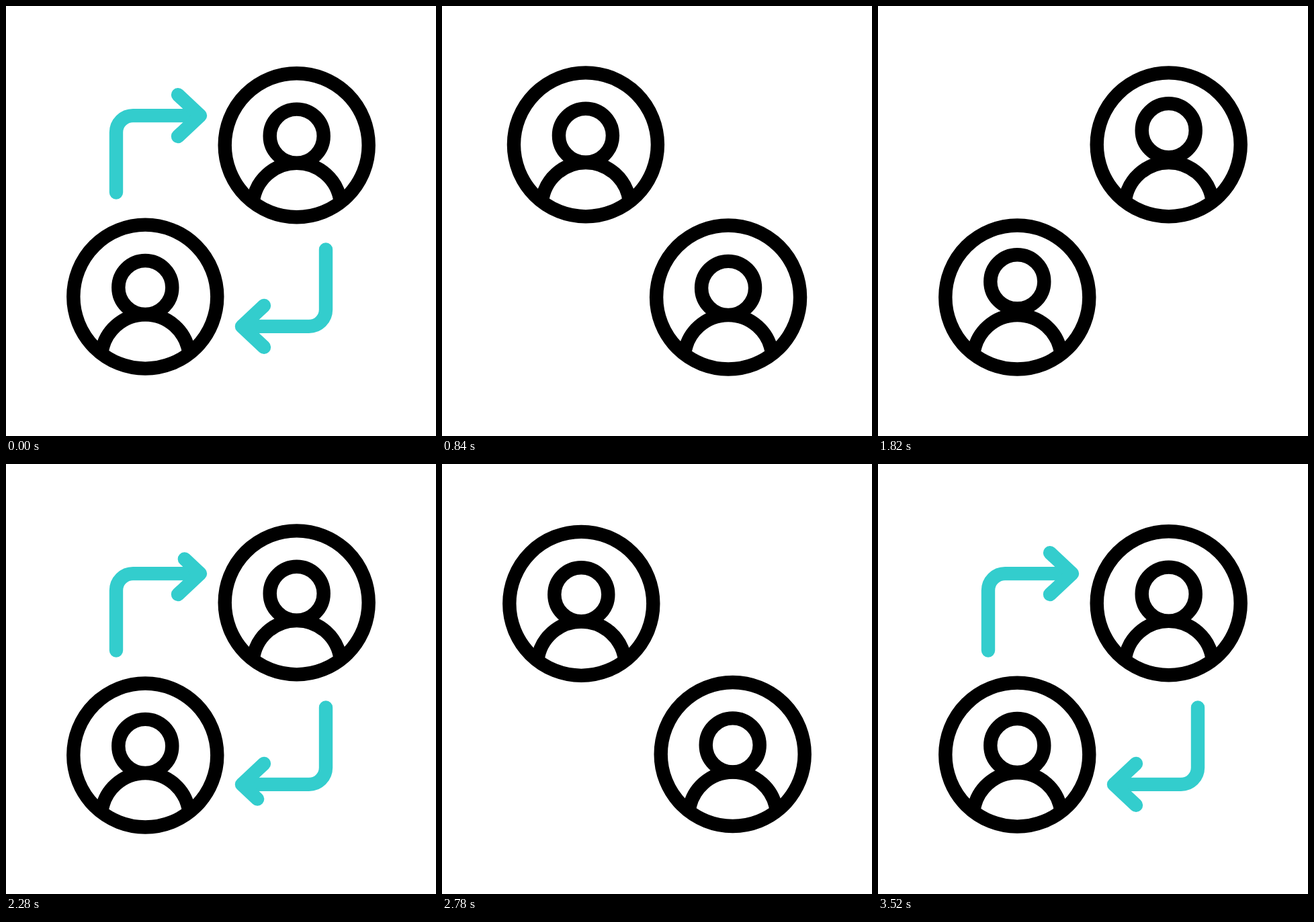
Animation of 640x640 px, one loop 3600 ms. Source, as an HTML page:

```html
<!DOCTYPE html>
<html lang="en">
<head>
<meta charset="utf-8">
<title>User swap</title>
<style>
  html, body { margin: 0; width: 100%; height: 100%; overflow: hidden; background: #fff; }
  svg { display: block; width: 100vw; height: 100vh; }
  g, path, circle { fill: none; stroke-width: 20.4; }
  .user { stroke: #000; }
  #arrow { stroke: #33cdcd; stroke-linecap: round; stroke-linejoin: round; }
</style>
</head>
<body>
<svg viewBox="0 0 640 640">
  <defs>
    <g id="bust">
      <circle r="107"/>
      <path d="M-65.1 84.9A65.5 65.5 0 0 1 65.1 84.9"/>
    </g>
  </defs>
  <g id="arrow">
    <path id="shaft" pathLength="1" d="M164 277.5V188A25 25 0 0 1 189 163.1H288"/>
    <path id="head" pathLength="1" d="M256 194L289 163.1L256 132.2"/>
  </g>
  <use href="#arrow" transform="rotate(180 320 320)"/>
  <g class="user"><use href="#bust"/><circle r="40"/></g>
  <g class="user"><use href="#bust"/><circle r="40"/></g>
</svg>
<script>
const LOOP = 3600;
const LEG = 400;     // one side of the square path
const STROKE = 160;  // time to draw or wipe one arrow part
const REACH = 112.7; // from the centre to a resting user

const users = document.querySelectorAll(".user");
const shaft = document.getElementById("shaft");
const head = document.getElementById("head");

// Smoothstep from 0 to 1
function ramp(t, start, duration) {
  const u = Math.min(1, Math.max(0, (t - start) / duration));
  return u * u * (3 - 2 * u);
}

function moveUsers(t) {
  // Clockwise: up, right, then after a pause down, left
  const [up, right, down, left] = [400, 800, 2400, 2800].map(start => ramp(t, start, LEG));
  const x = REACH * (2 * (right - left) - 1);
  const y = (REACH + 0.85 * (up - left)) * (1 - 2 * (up - down));
  const nod = t > 1200 && t < 2000 ? Math.sin(Math.PI * t / LEG) ** 2 : 0;

  users.forEach((user, i) => {
    const side = i ? -1 : 1;
    user.setAttribute("transform", `translate(${320 + side * x} ${319.9 + side * y})`);
    user.lastElementChild.setAttribute("cy", -13.6 - nod * (8.8 - side));
  });
}

// Draws a part from its tail, then wipes it from the tail
function trim(part, t, delay) {
  const [on, off] = [[3200, LOOP], [2000, 2320], [-400, 0]].find(([on]) => t >= on + delay);
  const start = ramp(t, off + delay, STROKE);
  const length = ramp(t, on + delay, STROKE) - start;
  part.setAttribute("visibility", length > 0.001 ? "visible" : "hidden");
  part.setAttribute("stroke-dasharray", `${length} 3`);
  part.setAttribute("stroke-dashoffset", -start);
}

function draw(t) {
  moveUsers(t);
  trim(shaft, t, 0);
  trim(head, t, STROKE);
}

const begin = performance.now();
function tick(now) {
  draw(Math.max(0, now - begin) % LOOP);
  requestAnimationFrame(tick);
}
draw(0);
requestAnimationFrame(tick);
</script>
</body>
</html>
```
